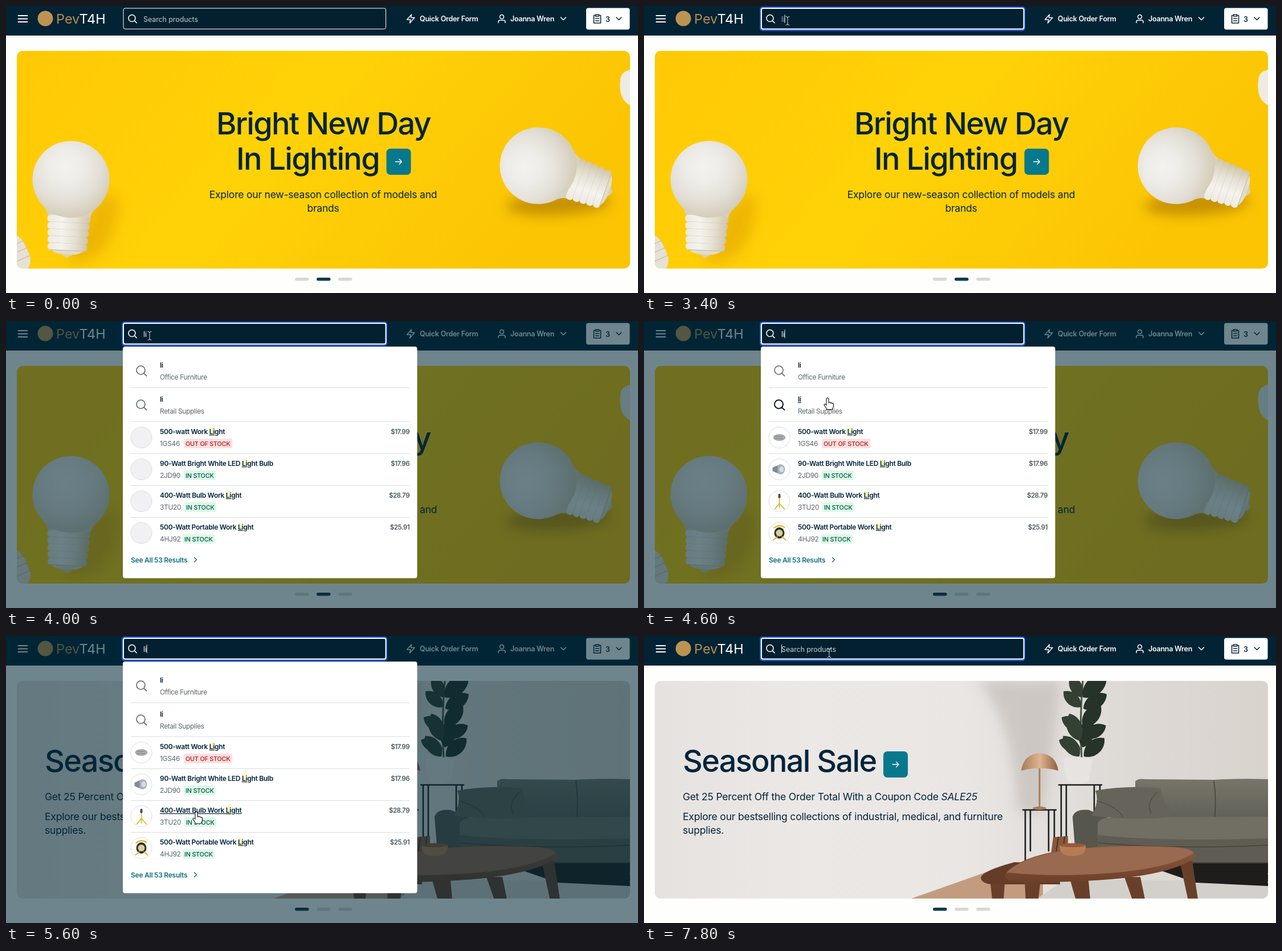
Recreate the animation shown at these times as an HTML page. Size 1109 by 505 pixels, loop 8 s.

```html
<!DOCTYPE html>
<html lang="en">
<head>
<meta charset="utf-8">
<style>
html, body { margin: 0; width: 100%; height: 100%; overflow: hidden; background: #fefefd; }
svg { display: block; stroke-width: 1.6; }
text { font-family: Inter, "Open Sans", sans-serif; font-size: 12.5px; letter-spacing: -.1px; fill: #02243a; white-space: pre; }
.head text { fill: #fff; font-weight: 600; letter-spacing: -.25px; }
.head .brand { font-size: 23.5px; font-weight: 400; letter-spacing: 0; }
.title { font-size: 54px; font-weight: 500; letter-spacing: -1.7px; }
.lead { font-size: 17.5px; letter-spacing: -.2px; }
.name { font-size: 12px; font-weight: 600; letter-spacing: -.3px; }
.sub { font-size: 12px; letter-spacing: -.35px; fill: #5b6569; }
.price { font-size: 11.5px; font-weight: 600; letter-spacing: -.5px; fill: #4c5a62; text-anchor: end; }
.badge { font-size: 10.8px; font-weight: 500; letter-spacing: -.2px; }
.line { fill: none; stroke-linecap: round; stroke-linejoin: round; }
.hover .name { text-decoration: underline; }
.hover .lens { stroke: #0b1a22; stroke-width: 2; }
</style>
</head>
<body>
<svg id="stage" width="1109" height="505" viewBox="0 0 1109 505"></svg>
<script>
const LOOP = 8000, STEP = 200, SLIDE = 1076;
const NAVY = '#022334', TEAL = '#08788c';

const text = (x, y, s, cls = '', more = '') => `<text x="${x}" y="${y}" class="${cls}" ${more}>${s}</text>`;
const rect = (x, y, w, h, fill, rx = 0, more = '') =>
  `<rect x="${x}" y="${y}" width="${w}" height="${h}" rx="${rx}" fill="${fill}" ${more}/>`;
const path = (d, fill, more = '') => `<path d="${d}" fill="${fill}" ${more}/>`;
const oval = (x, y, rx, ry, fill, more = '') =>
  `<ellipse cx="${x}" cy="${y}" rx="${rx}" ry="${ry}" fill="${fill}" ${more}/>`;
const line = (d, color = '#fff', more = '') => `<path class="line" d="${d}" stroke="${color}" ${more}/>`;
const group = (body, more = '') => `<g ${more}>${body}</g>`;
const use = (id, transform, more = '') => `<use href="#${id}" transform="${transform}" ${more}/>`;
const chevron = (x, y, color) => line(`M${x - 4.5} ${y - 2.5}l4.5 4.5l4.5 -4.5`, color);
const lens = (x, y, r, color) =>
  `<path class="line lens" stroke="${color}" d="M${x - r} ${y}a${r} ${r} 0 1 0 ${2 * r} 0a${r} ${r} 0 1 0 ${-2 * r} 0M${x + r * .75} ${y + r * .75}l${r * .6} ${r * .6}"/>`;
const arrowButton = (x, y) => rect(x, y, 43, 46, TEAL, 7) +
  line(`M${x + 16} ${y + 23}h11m-4.5 -4.5l4.5 4.5l-4.5 4.5`, '#fff', 'stroke-width="1.4"');
const stops = (...colors) => colors.map((c, i) =>
  `<stop offset="${i / (colors.length - 1)}" stop-color="${c}"/>`).join('');

function defs() {
  const ribs = [0, 1, 2, 3, 4].map(i => rect(-38 + i * .8, 64 + i * 12.2, 76 - i * 1.6, 13, 'url(#rib)', 6) +
    line(`M${-33 + i * .8} ${76.5 + i * 12.2}H${33 - i * .8}`, '#c9bfa5', 'stroke-width="1.2"')).join('');
  const bulb = path('M-17 122H17Q12 132 4 136Q0 141 -4 136Q-12 132 -17 122Z', '#dccfae') +
    path('M-32 120H32Q28 130 12 132H-12Q-28 130 -32 120Z', '#e2dccb') +
    path('M-61 28C-48 50 -38 54 -37 68H37C38 54 48 50 61 28Z', '#d8d0bd') + ribs +
    oval(0, 0, 67.5, 67.5, 'url(#globe)');
  return `<defs>
    <radialGradient id="globe" cx=".42" cy=".34" r=".68">${stops('#f3f2f0', '#eeece8', '#e3dfd6', '#d3cbb6')}</radialGradient>
    <linearGradient id="rib">${stops('#ece9e0', '#f5f3ee', '#e6e1d5', '#d0c5a8')}</linearGradient>
    <linearGradient id="sun" x2="1" y2=".3">${stops('#ffc905', '#ffcd06', '#ffd207', '#fecb07', '#fbc504')}</linearGradient>
    <linearGradient id="wall">${stops('#e6e2e0', '#ebe8e6', '#e9e6e4', '#dedad6', '#d8d3cd')}</linearGradient>
    <linearGradient id="copper">${stops('#a87a58', '#deb590', '#8f5f40')}</linearGradient>
    <linearGradient id="wood" x2="0" y2="1">${stops('#8f5c41', '#6d4029')}</linearGradient>
    <linearGradient id="cloth" x2="0" y2="1">${stops('#77756a', '#5c5b52')}</linearGradient>
    <filter id="soft" x="-40%" y="-60%" width="180%" height="220%"><feGaussianBlur stdDeviation="11"/></filter>
    <clipPath id="frame">${rect(19, 79, SLIDE, 383, '#000', 10)}</clipPath>
    <g id="bulb">${bulb}</g>
    <path id="leaf" d="M0 0C-15 -10 -17 -34 0 -46C17 -34 15 -10 0 0Z"/>
  </defs>`;
}

function lighting() {
  return rect(19, 79, SLIDE, 383, 'url(#sun)') +
    path('M150 350Q215 300 190 390Q170 460 105 450Z', '#d99a00', 'opacity=".45" filter="url(#soft)"') +
    oval(970, 348, 92, 20, '#a97400', 'opacity=".65" filter="url(#soft)" transform="rotate(-3 970 348)"') +
    use('bulb', 'translate(114 305) rotate(3)') +
    use('bulb', 'translate(934 281) rotate(-70)') +
    path('M19 404Q30 408 42 440Q45 455 37 463H19Z', '#e6e1d5') +
    line('M19 418l14 -6M19 433l19 -8M19 449l23 -10', '#cdc3a6') +
    path('M1096 112Q1079 115 1078 130Q1074 165 1096 175Z', '#eeebe4') +
    text(557, 226, 'Bright New Day', 'title', 'text-anchor="middle"') +
    text(404, 288, 'In Lighting', 'title') + arrowButton(667.5, 251) +
    text(556.5, 338, 'Explore our new-season collection of models and', 'lead', 'text-anchor="middle"') +
    text(556.5, 362, 'brands', 'lead', 'text-anchor="middle"');
}

function livingRoom() {
  const leaves = [[764, 212, -38, 1], [772, 212, 48, 1.05], [766, 200, -66, .9], [770, 196, 14, 1.15], [764, 184, -20, 1.1],
    [772, 178, 62, .95], [768, 165, -58, .9], [770, 160, 38, 1.1], [767, 125, -48, .9], [771, 128, 58, 1.05], [768, 108, -28, .9], [770, 108, 46, 1.25]]
    .map(([x, y, a, s], i) => use('leaf', `translate(${x} ${y}) rotate(${a}) scale(${s})`, `fill="${i % 2 ? '#253328' : '#334135'}"`)).join('');
  const stand = (x, y, w, bottom) => line(`M${x} ${y}h${w}M${x + 4} ${y}V${bottom}M${x + 13} ${y}V${bottom - 18}M${x + w - 13} ${y}V${bottom - 18}M${x + w - 3} ${y}V${bottom}`, '#1d1d1e', 'stroke-width="2.6"');
  const leg = (x, y, w, dx) => path(`M${x} ${y}h${w}l${dx} ${463 - y}h${-w * .8}Z`, '#684029');
  return rect(19, 79, SLIDE, 383, 'url(#wall)') +
    path('M585 79H730Q720 180 700 310H655Q650 150 585 79Z', '#b5aea7', 'opacity=".5" filter="url(#soft)"') +
    path('M469 462L610 412L700 395V462Z', '#c39c80') +
    path('M690 462L740 428L1095 432V462Z', '#d3d0cc') +
    path('M768 215Q764 150 770 79', 'none', 'stroke="#4a5340" stroke-width="3"') + leaves +
    path('M735 216Q761 210 787 216L781 255Q761 266 742 255Z', '#e6e3e0') +
    stand(728, 262, 75, 390) + stand(665, 306, 58, 396) +
    path('M662 237Q666 208 694 206Q723 208 727 237Q694 228 662 237Z', 'url(#copper)') +
    line('M694 234V301', '#a87d56', 'stroke-width="3"') + oval(694, 303, 12, 3, '#a87d56') +
    path('M714 385L718 354L744 352V385Z', '#86593d') + line('M723 382L727 354M735 382L738 353', '#3f2d22') +
    path('M752 318Q756 304 780 306L815 320V420H760Z', '#57564d') +
    path('M790 380H1095V412H790Z', '#454339') +
    path('M862 256Q866 250 880 252L1000 253Q1050 250 1095 252V340H862Z', 'url(#cloth)') +
    line('M1000 255Q1005 290 1001 325', '#45443c') +
    path('M796 330Q800 318 830 319L1095 318V372Q1000 378 900 370L796 366Z', '#716f63') +
    path('M796 350Q900 362 1095 356V398H796Z', '#5f5d53') +
    line('M797 364Q930 376 1095 368', '#45433b') +
    path('M785 316Q800 292 792 272Q850 262 906 268Q912 298 930 318Q860 326 785 316Z', '#66645a') +
    line('M795 290Q830 300 840 318M900 275Q880 295 890 312', '#514f47') +
    path('M870 400H1095V440L968 434Z', '#1f1d1c') +
    path('M591 425Q594 413 650 398L730 400V437H612Q592 436 591 425Z', '#643c28') +
    leg(608, 436, 25, -2) + leg(668, 428, 28, -4) + leg(748, 430, 32, 3) + leg(843, 424, 28, 8) + leg(940, 396, 22, 10) +
    path('M634 418Q660 388 740 376Q830 366 930 371Q970 374 967 390Q930 418 820 428Q720 436 640 431Q632 428 634 418Z', 'url(#wood)') +
    path('M636 416Q662 390 740 377Q830 367 930 372Q962 374 964 382Q925 408 820 417Q720 425 636 416Z', '#996a50') +
    path('M729 368H775Q777 387 752 387Q728 387 729 368Z', '#b67d55') + oval(752, 368, 23, 3.5, '#94593a') +
    text(68, 239, 'Seasonal Sale', 'title') + arrowButton(420, 203) +
    text(68, 289, 'Get 25 Percent Off the Order Total With a Coupon Code <tspan font-style="italic">SALE25</tspan>', 'lead') +
    text(68, 324, 'Explore our bestselling collections of industrial, medical, and furniture', 'lead') +
    text(68, 348, 'supplies.', 'lead');
}

function header() {
  const clipboard = line('M1033 16.5h-1.5v13.5h12v-13.5h-1.5M1034.5 15h6v3h-6ZM1034.5 22h6M1034.5 26h6', '#0b2a3b');
  return group(rect(0, 0, 1109, 52, NAVY) +
    line('M21.5 17H37.5M21.5 22.5H37.5M21.5 28H37.5', '#fff', 'stroke-width="1.8"') +
    oval(69, 22, 13.5, 13.5, '#bd9352') +
    text(88, 30.5, '<tspan fill="#b88d50">Pev</tspan>T4H', 'brand') +
    line('M711.5 15L703.5 24H710L708.5 30L717 20.5H710.5Z', '#fff', 'stroke-width="1.4"') +
    text(726, 27, 'Quick Order Form') +
    line('M866.5 19a3.5 3.5 0 1 0 7 0a3.5 3.5 0 1 0 -7 0M864 29.5v-1.5q0 -3 3 -3h6q3 0 3 3v1.5', '#fff', 'stroke-width="1.5"') +
    text(885, 27, 'Joanna Wren') + chevron(978, 22.5, '#fff') +
    rect(1018, 3.5, 76.5, 38, '#fff', 4) + clipboard +
    text(1052, 27.5, '3', '', 'style="fill:#0b2a3b"') + chevron(1075.5, 22.5, '#0b2a3b'), 'class="head"');
}

const products = [
  ['500-watt Work Light', '1GS46', '$17.99', 312, false],
  ['90-Watt Bright White LED Light Bulb', '2JD90', '$17.96', 312, true],
  ['400-Watt Bulb Work Light', '3TU20', '$28.79', 313, true],
  ['500-Watt Portable Work Light', '4HJ92', '$25.91', 310, true]
];
const pictures = [
  oval(0, 0, 11, 6, '#a9abb0') + line('M-8 -2H6M-8 2H6', '#7e8186', 'stroke-width="1"'),
  oval(2, 0, 8, 9, '#a5b2bb') + path('M-12 -3L-3 -7V7L-12 3Z', '#7f8a93') + oval(4, 0, 4, 5, '#d3dde2'),
  line('M0 -4V6M0 4L-8 14M0 4L9 14M0 4V12', '#d9b51c') + rect(-2, -13, 4, 8, '#4b4b48', 2),
  oval(0, 0, 9, 10, '#2f3030') + oval(0, 0, 6, 6, '#d8cf9b') + line('M-9 -9Q0 -16 9 -10M-10 12L-4 7M11 12L5 7', '#e2b91a', 'stroke-width="2.2"')
];

function popup() {
  const rule = y => rect(219, y, 489, 1, '#d9dddd');
  const category = (label, y) => group(lens(236.5, y - 1.5, 7.5, '#59636a') +
    text(270, y - 6, 'li', 'name') + text(270, y + 14.5, label, 'sub'), 'class="row"');
  const product = ([name, code, price, x, inStock], i) => {
    const y = 205 + i * 56;
    const [label, width, back, ink] = inStock ? ['IN STOCK', 56, '#dcf9ea', '#07583a'] : ['OUT OF STOCK', 85, '#fde0df', '#b0191b'];
    return group(oval(237.5, y, 18.5, 18.5, '#f1f1f5', 'class="blank" stroke="#dcdde2" stroke-width="1"') +
      group(pictures[i], `class="picture" transform="translate(237.5 ${y})"`) +
      text(270, y - 6, name.replace('Li', '<tspan text-decoration="underline">Li</tspan>'), 'name marked') +
      text(270, y + 15, code, 'sub') + rect(x, y + 2, width, 17, back, 2) +
      text(x + 3, y + 14.5, label, 'badge', `style="fill:${ink}"`) +
      text(708, y - 6, price, 'price'), 'class="row"');
  };
  return group(rect(205, 45, 516.5, 407.5, '#fff', 4) +
    category('Office Furniture', 88) + category('Retail Supplies', 148) +
    [117, 176.5, 233, 289, 345].map(rule).join('') + products.map(product).join('') +
    group(text(219, 425, 'See All 53 Results', 'name', 'style="fill:#0b7180;letter-spacing:-.25px"') +
      line('M330.5 416l4 4l-4 4', '#0b7180', 'stroke-width="1.5"'), 'class="row"'), 'id="popup"');
}

const field = rect(203, 1, 466, 43, '#2458d8', 5, 'id="glow"') +
  rect(206, 4, 460.5, 36.5, '#02202f', 3, 'id="box" stroke="#fff"') + lens(221, 21.5, 6, '#fff') +
  text(241, 27.5, '', '', 'id="query"') + rect(241, 15, 1, 15, '#e8edef', 0, 'id="caret"');

const cursors = group(line('M-3 -7.5Q0 -7.5 0 -5.5Q0 -7.5 3 -7.5M0 -5.5V5.5M-3 7.5Q0 7.5 0 5.5Q0 7.5 3 7.5', '#d3d5cf', 'id="beam" stroke-width="1"') +
  path('M-2 1Q0 -2 2 1V8Q4 6 5 8.5Q7 7 8 9.5Q10 8 10.5 11V15L8 20H-1L-6 12Q-6 9 -2 12Z', '#fff', 'id="hand" stroke="#222" stroke-width="1.2"') +
  path('M0 0V16L4 12.5L6.5 18L9 17L6.5 11.5H12Z', '#111', 'id="arrow" stroke="#fff" stroke-width="1"'), 'id="cursor"');

const dots = [507, 545, 583].map(x => rect(x, 478, 24.5, 5.5, '#d9d9d4', 2.7, 'class="dot"')).join('');

stage.innerHTML = defs() + rect(0, 0, 1109, 505, '#fefefd') + header() +
  group(group(livingRoom() + group(lighting(), `transform="translate(${SLIDE} 0)"`), 'id="track"'), 'clip-path="url(#frame)"') +
  dots + rect(0, 0, 1109, 505, 'rgba(0,40,54,.56)', 0, 'id="shade"') + field + popup() + cursors;

const find = id => document.getElementById(id);
const all = s => [...stage.querySelectorAll(s)];
const show = (el, on) => el.setAttribute('visibility', on ? 'inherit' : 'hidden');

// Yellow marker behind the matched letters
all('.marked').forEach(el => {
  const i = el.textContent.indexOf('Li');
  const a = el.getExtentOfChar(i), b = el.getExtentOfChar(i + 1);
  el.insertAdjacentHTML('beforebegin', rect(a.x, a.y, b.x + b.width - a.x, a.height, '#fff5c2'));
});

const typed = [[0, ''], [2000, 'l'], [2200, 'li'], [7400, 'l'], [7600, '']];
const blink = [[0, 0], [1600, 1], [1800, 0], [2000, 1], [2800, 0], [3200, 1], [3800, 0], [4600, 1],
  [5200, 0], [5600, 1], [6200, 0], [6600, 1], [7200, 0], [7600, 1]];
const route = [[1200, 300, 400], [1600, 252, 26], [4000, 252, 26], [4800, 335, 156], [5200, 338, 200],
  [6000, 330, 420], [6300, 330, 425], [7000, 325, 30]];
const rowEdges = [58, 118, 177, 234, 290, 346, 402, 440];

const valueAt = (table, t) => table.filter(([start]) => start <= t).pop()[1];

function pointAt(t) {
  const i = route.findIndex(([time]) => time > t);
  if (i < 0) return route[route.length - 1].slice(1);
  if (i === 0) return null;
  const [t0, x0, y0] = route[i - 1], [t1, x1, y1] = route[i];
  const k = (t - t0) / (t1 - t0), s = k * k * (3 - 2 * k);
  return [x0 + (x1 - x0) * s, y0 + (y1 - y0) * s];
}

// CSS "ease": cubic-bezier(.25, .1, .25, 1)
function ease(k) {
  const curve = (u, a, b) => 3 * a * u * (1 - u) ** 2 + 3 * b * u * u * (1 - u) + u ** 3;
  let low = 0, high = 1;
  for (let n = 0; n < 20; n++) {
    const mid = (low + high) / 2;
    curve(mid, .25, .25) < k ? low = mid : high = mid;
  }
  return curve(low, .1, 1);
}

function draw(t) {
  const open = t >= 3800 && t < 7600, focused = t >= 1600;
  const query = valueAt(typed, t), point = pointAt(t);

  const slide = ease(Math.min(1, Math.max(0, (t - 4600) / 500)));
  find('track').setAttribute('transform', `translate(${SLIDE * (slide - 1)} 0)`);
  all('.dot').forEach((el, i) => el.setAttribute('fill', i === (t < 4600 ? 1 : 0) ? '#0b3c4e' : '#d9d9d4'));

  show(find('shade'), open);
  show(find('popup'), open);
  show(find('glow'), focused);
  find('box').setAttribute('stroke-width', focused ? 2 : 1);
  const label = find('query');
  label.textContent = query || 'Search products';
  label.style.fill = !query ? '#c3ccd1' : open ? '#fff' : '#9aa7ae';
  show(find('caret'), valueAt(blink, t));
  find('caret').setAttribute('x', 241 + query.length * 2.8);

  all('.picture').forEach(el => show(el, open && t >= 4200));
  all('.blank').forEach(el => el.setAttribute('fill', t < 4200 ? '#f1f1f5' : '#fff'));

  const y = point ? point[1] : 0;
  all('.row').forEach((el, i) => el.classList.toggle('hover', open && y >= rowEdges[i] && y < rowEdges[i + 1]));
  show(find('cursor'), point);
  if (point) find('cursor').setAttribute('transform', `translate(${point})`);
  const kind = y < 44 ? 'beam' : open ? 'hand' : 'arrow';
  ['beam', 'hand', 'arrow'].forEach(id => show(find(id), id === kind));
}

const start = performance.now();
function tick() {
  const t = (performance.now() - start) % LOOP;
  draw(Math.floor(t / STEP) * STEP);
  requestAnimationFrame(tick);
}
tick();
</script>
</body>
</html>
```
